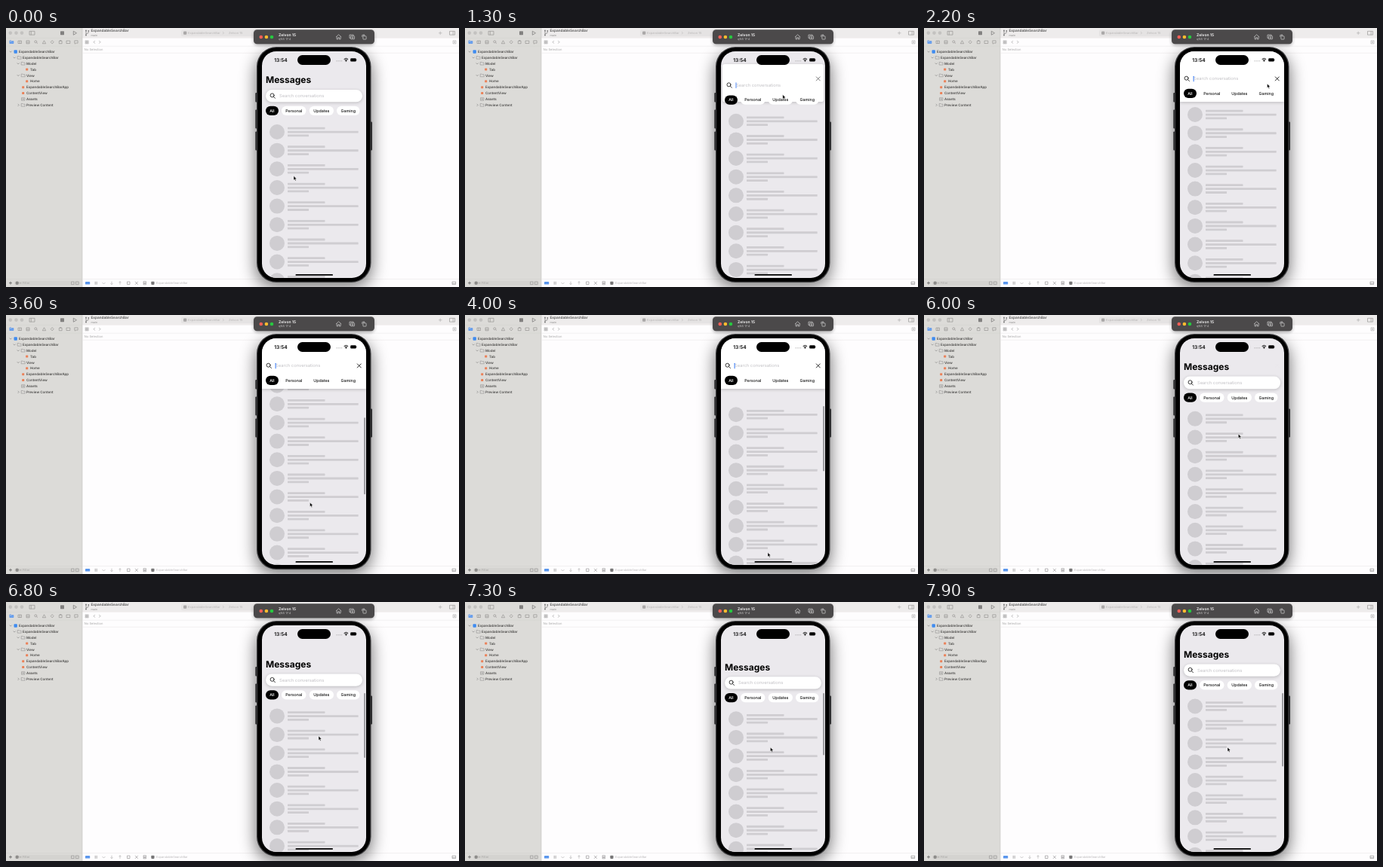
Write an HTML page that moves like this. It is 600x344 px and loops after 8 s.

```html
<!DOCTYPE html>
<html lang="en">
<head>
<meta charset="utf-8">
<title>Expandable search bar</title>
<style>
  html, body { margin: 0; width: 100%; height: 100%; overflow: hidden; background: #fefdfe; }
  svg { display: block; width: 600px; height: 344px; }
  text { font-family: Inter, Roboto, sans-serif; text-rendering: geometricPrecision; }
</style>
</head>
<body>
<svg id="stage" viewBox="0 0 600 344" xmlns="http://www.w3.org/2000/svg">
  <defs>
    <filter id="wide" x="-60%" y="-30%" width="220%" height="160%"><feGaussianBlur stdDeviation="11"/></filter>
    <filter id="soft" x="-20%" y="-60%" width="140%" height="220%"><feGaussianBlur stdDeviation="2"/></filter>
    <clipPath id="screen"><rect x="339" y="31" width="138" height="301" rx="19"/></clipPath>
  </defs>

  <g id="editor"></g>

  <g id="phone">
    <rect x="328" y="4" width="160" height="19" rx="5" opacity=".3" filter="url(#soft)"/>
    <rect x="331" y="34" width="153" height="310" rx="25" opacity=".55" filter="url(#wide)"/>
    <g fill="#29292b">
      <rect x="330.3" y="86" width="3" height="12.5" rx="1"/>
      <rect x="330.3" y="108.5" width="3" height="25" rx="1"/>
      <rect x="330.3" y="137.5" width="3" height="25" rx="1"/>
      <rect x="482" y="124.5" width="3" height="38" rx="1"/>
    </g>
    <rect x="332" y="25" width="151.5" height="313" rx="26" fill="#3b3b3d"/>
    <rect x="333.2" y="26.2" width="149.1" height="310.6" rx="25"/>
    <g clip-path="url(#screen)">
      <rect x="339" y="31" width="138" height="301" fill="#ebe9ed"/>
      <g id="list" fill="#cfcdd1"></g>
      <g id="header">
        <text x="344" y="73.3" font-size="12" font-weight="700">Messages</text>
        <rect id="shade" opacity=".2" filter="url(#soft)"/>
        <rect id="bar" fill="#fff"/>
        <g id="field">
          <g fill="none" stroke="#222" stroke-width=".9" stroke-linecap="round">
            <circle cx="352.6" cy="89.4" r="2.5"/><path d="M354.5 91.3l2 2"/>
          </g>
          <text x="362" y="92.2" font-size="5.8" fill="#c2c1c5">Search conversations</text>
          <rect id="caret" x="361.6" y="86.4" width="1" height="7.6" rx=".5" fill="#3478f6"/>
        </g>
        <path id="close" d="M465.3 64.9l5 5m0-5l-5 5" stroke="#111" stroke-width=".9" stroke-linecap="round"/>
        <g id="chips" font-size="5.3" font-weight="500" text-anchor="middle"></g>
      </g>
      <rect id="indicator" x="474.3" width="1.5" rx=".75" fill="#858488"/>
      <rect x="386" y="36" width="44" height="13" rx="6.5"/>
      <text x="364" y="44.8" font-size="6.6" font-weight="600" text-anchor="middle">13:54</text>
      <path d="M437.5 43.8h7.6" stroke="#999" stroke-width=".9" stroke-dasharray="1 1.2"/>
      <g fill="none" stroke="#000" stroke-width="1">
        <path d="M447.7 41.5q2.7-2.3 5.4 0M448.8 43q1.6-1.3 3.2 0"/>
      </g>
      <circle cx="450.4" cy="44" r=".8"/>
      <rect x="456.2" y="40.2" width="7.6" height="4.3" rx="1.3"/>
      <path d="M464.5 41.5v1.7" stroke="#777" stroke-width=".6"/>
      <rect x="383.5" y="327" width="49.5" height="1.8" rx=".9"/>
    </g>
    <rect x="328" y="2.3" width="160" height="19" rx="4.5" fill="#4b494a"/>
    <circle cx="337.8" cy="12" r="2.3" fill="#fe5f57"/>
    <circle cx="344.9" cy="12" r="2.3" fill="#febc2e"/>
    <circle cx="352" cy="12" r="2.3" fill="#28c840"/>
    <text x="361" y="11.2" font-size="5" font-weight="600" fill="#fff">Zelvon 15</text>
    <text x="361" y="16.4" font-size="4" fill="#c4c3c3">qNS 17.4</text>
    <g fill="none" stroke="#d2d1d1" stroke-width=".7" stroke-linejoin="round">
      <path d="M437 12l3.6-3.2L444.200 12M438.100 11.500v3.400h1.700v-2.200h1.600v2.200h1.700v-3.400"/>
      <path d="M456 13.400h-1v-4.300h5.200v1"/>
      <rect x="456.400" y="10.700" width="5.200" height="4" rx=".6"/><circle cx="459" cy="12.700" r=".9"/>
      <rect x="472.900" y="10.800" width="4.200" height="4.200" rx=".5"/><path d="M471.800 12v-2.600h3m-1-1.100l1.100 1.100-1.100 1.100"/>
    </g>
  </g>

  <path id="cursor" d="M0 0v5.600l1.300-1.100 .9 2 1-.4-.9-2h1.700z" fill="#000" stroke="#fff" stroke-width=".45"/>
</svg>
<script>
const $ = id => document.getElementById(id);
const rect = (x, y, w, h, fill, r = 0) => `<rect x="${x}" y="${y}" width="${w}" height="${h}" rx="${r}" fill="${fill}"/>`;
const label = (x, y, size, str, fill = '#333', weight = 400) =>
  `<text x="${x}" y="${y}" font-size="${size}" fill="${fill}" font-weight="${weight}">${str}</text>`;
const line = (d, stroke = '#8b8a89', width = .6) => `<path d="${d}" fill="none" stroke="${stroke}" stroke-width="${width}"/>`;
const dot = (x, y, r, fill) => `<circle cx="${x}" cy="${y}" r="${r}" fill="${fill}"/>`;
const folder = (x, y, color = '#929191') => line(`M${x - 2.5} ${y + 1.8}v-3.7h2l.6.7h2.400v3z`, color);

function drawEditor() {
  const project = 'ExpandableSearchBar';
  const parts = [
    rect(0, 0, 600, 344, '#fefdfe'),
    rect(101, 0, 499, 13, '#eeecec'),
    rect(0, 0, 101, 344, '#dcdbd8'),
    line('M101 0V344', '#c4c3c1'),
    line('M101 13.300H600M101 24.200H600M101 33.300H600M101 333.500H600', '#e4e2e3', .5),
    line('M0 13.300H101M0 24.200H101M0 333.500H101', '#cfcecb', .5),
    ...[5.8, 13.500, 21].map(x => dot(x, 6.600, 2.300, '#c3c2c0')),
    line('M31 4.300h7v4.800h-7zM33.300 4.300v4.800'),
    rect(72, 4.200, 5, 5, '#828180', .6),
    line('M89.300 4.200l4.200 2.500-4.200 2.500z', '#828180', .8),
    folder(7.400, 18.700, '#2f7cf0'), rect(5, 17.800, 5, 2.800, '#6aa1ee'),
    line('M16 17h4.500v3.500H16zM18.200 17v3.500'),
    line('M27 16.800h4v4h-4zM27 19h4'),
    line('M42 20.700l-1.700-1.700M40.800 18.200a1.500 1.500 0 1 0-3 0a1.500 1.500 0 1 0 3 0'),
    line('M48.300 20.700l2.200-4 2.200 4z'),
    line('M61.200 16.500l2 2.200-2 2.200-2-2.200z'),
    line('M70.300 17.300h3.800v3.400h-3.800zM71 16.500h2.500'),
    line('M80 17h4.800v3.500H80z'),
    line('M90.800 16.800h4.300v3.300h-2.500l-1.200 1v-1h-.6z'),

    line('M106 3v7M109.300 4v1.700q0 1.700-3.300 2', '#777', .7),
    dot(106, 3.500, .9, '#777'), dot(109.300, 3.800, .9, '#777'), dot(106, 9.500, .9, '#777'),
    label(112.500, 5.300, 4.700, project, '#555', 600),
    label(112.500, 10.600, 3.700, 'main', '#929191'),
    rect(232, 2.200, 200, 9, '#e5e3e3', 2),
    rect(235, 4.500, 4.300, 4.300, '#aaa8a8', 1),
    label(241, 8.300, 4.100, project, '#b9b7b7'),
    line('M287 5l1.500 1.600-1.500 1.600', '#b9b7b7'),
    label(295, 8.300, 4.100, 'Zelvon 15', '#b9b7b7'),
    line('M573 6.700h4.500M575.200 4.500v4.400', '#a9a8a8'),
    line('M587.500 4.300h7v4.800h-7zM592.200 4.300v4.800'),
    line('M105 16.800h1.700v1.700H105zM107.500 16.800h1.700v1.700h-1.700zM105 19.200h1.700v1.700H105zM107.500 19.200h1.700v1.700h-1.700z', '#888', .5),
    line('M117.800 16.900l-1.700 1.800 1.700 1.800M123.300 16.900l1.700 1.800-1.700 1.800', '#888'),
    line('M592 16.800h4v4h-4zM594 17.600v2.400M592.800 18.800h2.400', '#999', .5),
    label(103.800, 30.400, 4.100, 'No Selection', '#a5a4a5'),

    line('M4 338.700h4M6 336.700v4', '#555', .7),
    rect(11, 335.700, 87, 6.300, '#d4d3d0', 3),
    dot(14.700, 338.800, 2.200, '#8d8c8a'), line('M17.500 338.800h3', '#8d8c8a'),
    label(22, 340.300, 4, 'Filter', '#a6a5a3'),
    line('M86.500 337h3.600v3.600h-3.600zM92.500 337h3.600v3.600h-3.600z', '#929190'),
    rect(105, 337, 6.200, 3.600, '#5a96ed', .7),
    line('M118.200 336.800v4M120.200 336.800v4', '#8a898a', .7),
    line('M127.500 338l2 2 2-2M140 336.700v4l-1.500-1.500M140 340.700l1.500-1.500M151 340.700v-4l-1.500 1.500M151 336.700l1.500 1.500', '#a6a5a6'),
    line('M160.500 337h3.500v3.500h-3.500zM171 336.800l3.800 4M171 340.800l3.800-4M182 336.700h3.500v2H182zM182 339.300h3.500v1.500H182z', '#8a898a'),
    rect(192.300, 336.700, 4.200, 4.200, '#777677', .8),
    label(199, 340.300, 4, project, '#bbb9bb'),
    line('M591 337h4.600v3.600H591zM591 339.200h4.600', '#888'),
  ];
  // [indent, name, icon, disclosure]
  const tree = [
    [17, project, 'project', 'open'], [22, project, 'folder', 'open'], [27, 'Model', 'folder', 'open'],
    [32, 'Tab', 'code'], [27, 'View', 'folder', 'open'], [32, 'Home', 'code'],
    [27, project + 'App', 'code'], [27, 'ContentView', 'code'], [27, 'Assets', 'assets'],
    [27, 'Preview Content', 'folder', 'shut'],
  ];
  tree.forEach(([x, name, icon, arrow], i) => {
    const y = 31.500 + i * 7.870, ix = x - 4.300;
    if (icon === 'project') parts.push(rect(ix - 2.200, y - 2.200, 4.400, 4.400, '#3f8cf0', .9));
    if (icon === 'folder') parts.push(folder(ix, y));
    if (icon === 'code') parts.push(rect(ix - 1.500, y - 1.500, 3, 3, '#eb8057', .6));
    if (icon === 'assets') parts.push(line(`M${ix - 2.200} ${y - 1.700}h4.400v3.400h-4.400z`), dot(ix, y, .8, '#929191'));
    if (arrow === 'open') parts.push(line(`M${x - 12.300} ${y - .8}l1.500 1.500 1.500-1.500`, '#777'));
    if (arrow === 'shut') parts.push(line(`M${x - 11.300} ${y - 1.500}l1.500 1.500-1.500 1.500`, '#777'));
    parts.push(label(x, y + 1.600, 4.500, name, '#383736', 500));
  });
  $('editor').innerHTML = parts.join('');
}

function drawRows() {
  let rows = '';
  for (let i = 0; i < 20; i++) {
    const y = 138 + i * 24.650;
    rows += `<circle cx="359" cy="${y}" r="10"/>`;
    [[49.500, -6.300], [93.700, -1.300], [28, 3.500]].forEach(([w, dy]) => {
      rows += `<rect x="373" y="${y + dy}" width="${w}" height="2.800" rx=".4"/>`;
    });
  }
  $('list').innerHTML = rows;
  const tabs = [['All', 344, 17], ['Personal', 365, 32.500], ['Updates', 401.700, 32.300], ['Gaming', 438, 30.500]];
  $('chips').innerHTML = tabs.map(([name, x, w], i) =>
    rect(x, 103.700, w, 12.300, i ? '#fff' : '#000', 6.150) +
    label(x + w / 2, 111.700, 5.300, name, i ? '#111' : '#fff', 500)).join('');
}

const LOOP = 8000;
const OPEN = 1150, CLOSE = 5500;
const PATH = [
  [0, 381, 196.500], [200, 381, 196.500], [850, 420, 90], [1500, 421, 88], [1850, 421, 88],
  [2200, 454.500, 74], [2350, 458, 72], [2700, 406, 172], [2950, 403, 295], [3050, 403, 295],
  [3350, 403, 205], [3600, 402.500, 249], [4000, 401, 315.500], [4400, 402, 255], [4750, 403, 316],
  [4800, 404, 314], [5000, 475, 73], [5300, 468, 68], [5650, 468, 68], [6050, 414, 162],
  [6150, 414, 162], [6450, 414, 105], [6800, 414, 178], [7000, 409, 192], [7150, 406, 193],
  [7500, 402, 193], [LOOP, 402, 193],
];
const DRAGS = [{ start: 3000, end: 4800, anchor: 295 }, { start: 6150, end: 7150, anchor: 162 }];

const clamp = v => Math.min(1, Math.max(0, v));
const mix = (a, b, k) => a + (b - a) * k;
const settle = (ms, rate) => ms <= 0 ? 0 : 1 - (1 + rate * ms / 1000) * Math.exp(-rate * ms / 1000);

function cursorAt(t) {
  const i = Math.max(1, PATH.findIndex(key => key[0] >= t));
  const [t0, x0, y0] = PATH[i - 1], [t1, x1, y1] = PATH[i];
  const k = (t - t0) / (t1 - t0), e = k * k * (3 - 2 * k);
  return [mix(x0, x1, e), mix(y0, y1, e)];
}

// Finger-locked while dragging, with a damped return once released
function scrollAt(t) {
  const drag = DRAGS.filter(d => t >= d.start).pop();
  if (!drag) return { offset: 0, visible: 0 };
  const pull = drag.anchor - cursorAt(Math.min(t, drag.end))[1];
  const held = pull < 0 ? pull * .84 : pull;
  const since = t - drag.end;
  return {
    offset: held * (1 - settle(since, 8)),
    visible: clamp((t - drag.start) / 100) * clamp(1 - (since - 800) / 300),
  };
}

const set = (id, attrs) => Object.entries(attrs).forEach(([k, v]) => $(id).setAttribute(k, v));
const move = (id, x, y) => set(id, { transform: `translate(${x} ${y})` });

function render(t) {
  const { offset, visible } = scrollAt(t);
  const focus = settle(t - OPEN, 14) - settle(t - CLOSE, 14);
  const p = Math.max(focus, clamp(offset / 23));
  const over = Math.max(0, -offset);

  move('list', 0, -23 * focus - offset);
  move('header', 0, over * (1 - focus));
  const bar = {
    x: mix(344, 339, p), y: mix(82, 27, p), width: mix(128, 138, p),
    height: mix(16.300, 71, p), rx: mix(8.150, 0, p),
  };
  set('bar', bar);
  set('shade', { ...bar, y: bar.y + 1 });
  move('field', -5 * p, -22.700 * p);
  move('chips', 0, -23 * p);
  set('caret', { opacity: clamp(focus * 3 - 1) });
  set('close', { opacity: focus });

  const length = mix(98, 102, focus) - over * .9;
  set('indicator', { y: 121 + Math.max(0, offset) / 3, height: length, opacity: visible });
  move('cursor', ...cursorAt(t));
}

drawEditor();
drawRows();
const begin = performance.now();
function tick() {
  const t = (performance.now() - begin) % LOOP;
  render(Math.floor(t / 100) * 100);
  requestAnimationFrame(tick);
}
tick();
</script>
</body>
</html>
```
